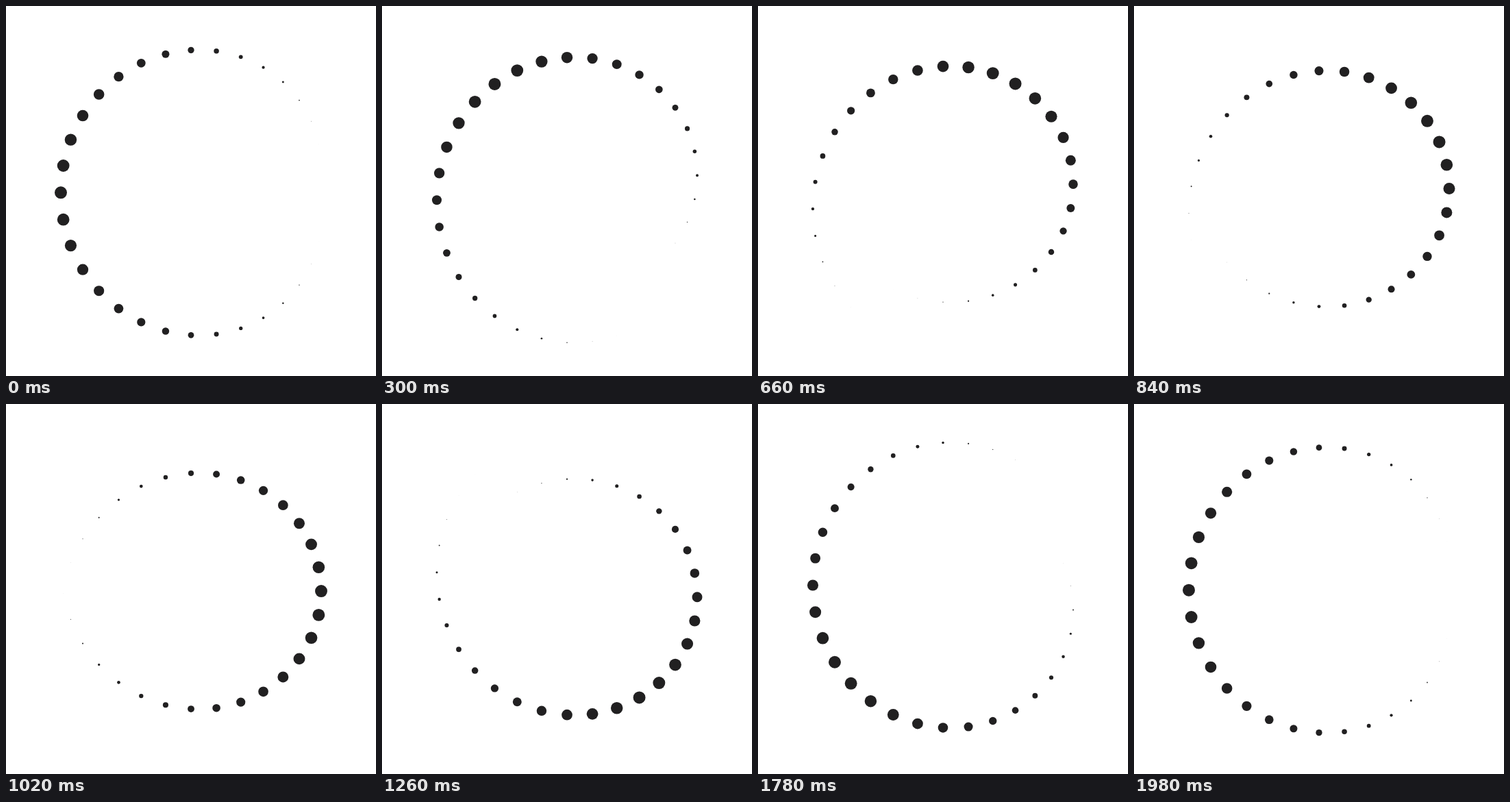
An HTML page with a canvas for the animation above (2 s loop, 540 by 540 pixels).

```html
<!DOCTYPE html>
<html lang="en">
<head>
<meta charset="utf-8">
<title>Falling dots ring</title>
<style>
  html, body { margin: 0; width: 100%; height: 100%; overflow: hidden; background: #fff; }
  canvas { display: block; }
</style>
</head>
<body>
<canvas id="stage" width="540" height="540"></canvas>
<script>
const ctx = document.getElementById('stage').getContext('2d');
const COUNT = 32, RING = 190, CX = 270, CY = 272;
const DROP = 72, MAX_R = 9, STEP = 20, STEPS = 100;

// Each dot falls DROP pixels per loop, growing and shrinking on the way.
function draw(ms) {
  const time = (Math.floor(ms / STEP) % STEPS + 0.5) / STEPS;
  ctx.clearRect(0, 0, 540, 540);
  ctx.fillStyle = '#212021';
  for (let i = 0; i < COUNT; i++) {
    const angle = 2 * Math.PI * i / COUNT;
    const phase = (time - i / COUNT + 1) % 1;
    const x = CX + RING * Math.cos(angle);
    const y = CY + RING * Math.sin(angle) + DROP * (phase - 0.5);
    ctx.beginPath();
    ctx.arc(x, y, MAX_R * Math.sin(Math.PI * phase) ** 2, 0, 2 * Math.PI);
    ctx.fill();
  }
}

const start = performance.now();
function tick() {
  draw(performance.now() - start);
  requestAnimationFrame(tick);
}
tick();
</script>
</body>
</html>
```
